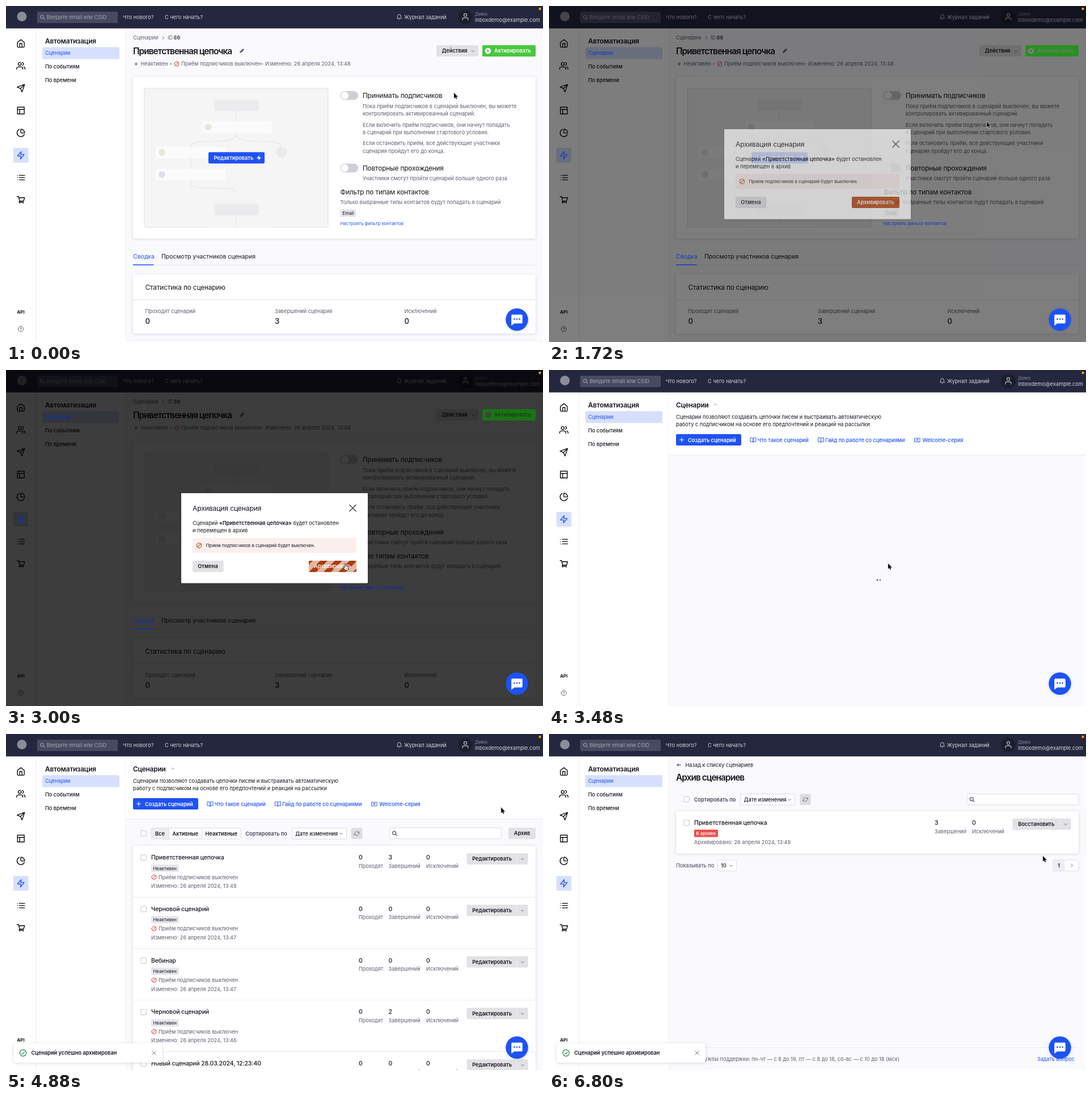
An HTML page for the animation above (6840 ms loop, 947 by 592 pixels).

```html
<!DOCTYPE html>
<html lang="ru">
<head>
<meta charset="utf-8">
<title>Архивация сценария</title>
<style>
html, body { margin: 0; width: 100%; height: 100%; overflow: hidden; background: #fafafd; }
svg { display: block; width: 100%; height: 100%; font-family: Inter, "Noto Sans", sans-serif; }
text { white-space: pre; }
</style>
</head>
<body>
<svg id="stage" viewBox="0 0 947 592"></svg>
<script>
const LOOP = 6840, STEP = 40;
const BLUE = '#1f52f5', INK = '#15161f', GREY = '#5c5e70', RED = '#dc3a35', RUST = '#b8430f', BTN = '#e2e2e5';

const ICON = {
  home: 'M3 9l9-7 9 7v11a2 2 0 0 1-2 2H5a2 2 0 0 1-2-2zM9 22V12h6v10',
  users: 'M17 21v-2a4 4 0 0 0-4-4H5a4 4 0 0 0-4 4v2M23 21v-2a4 4 0 0 0-3-3.87M16 3.13a4 4 0 0 1 0 7.75M5 7a4 4 0 1 0 8 0a4 4 0 1 0-8 0',
  send: 'M22 2L11 13M22 2l-7 20-4-9-9-4z',
  layout: 'M3 3h18v18H3zM3 9h18M9 21V9',
  pie: 'M21.2 15.9A10 10 0 1 1 8 2.8M22 12A10 10 0 0 0 12 2v10z',
  zap: 'M13 2L3 14h9l-1 8 10-12h-9z',
  list: 'M8 6h14M8 12h14M8 18h14M3 6h.01M3 12h.01M3 18h.01',
  cart: 'M2 3h4l3 12h10l3-9H7M9 15l-2 3h12M9 21h.01M18 21h.01',
  bell: 'M18 8A6 6 0 0 0 6 8c0 7-3 9-3 9h18s-3-2-3-9M13.7 21a2 2 0 0 1-3.4 0',
  user: 'M20 21v-2a4 4 0 0 0-4-4H8a4 4 0 0 0-4 4v2M8 7a4 4 0 1 0 8 0a4 4 0 1 0-8 0',
  book: 'M2 3h6a4 4 0 0 1 4 4v14a3 3 0 0 0-3-3H2zM22 3h-6a4 4 0 0 0-4 4v14a3 3 0 0 1 3-3h7z',
  video: 'M2 5h20v14H2zM10 9v6l5-3z',
  refresh: 'M23 4v6h-6M1 20v-6h6M3.5 9a9 9 0 0 1 14.9-3.4L23 10M1 14l4.6 4.4A9 9 0 0 0 20.5 15',
  search: 'M3 10a7 7 0 1 0 14 0a7 7 0 1 0-14 0M21.5 21.5l-6-6',
  ban: 'M2 12a10 10 0 1 0 20 0a10 10 0 1 0-20 0M19 5L5 19',
  check: 'M2 12a10 10 0 1 0 20 0a10 10 0 1 0-20 0M7.5 12.5l3 3 6-6',
  help: 'M2 12a10 10 0 1 0 20 0a10 10 0 1 0-20 0M9 9.5a3 3 0 1 1 3 3.5M12 17h.01',
  back: 'M21 12H4M11 5l-7 7 7 7',
  down: 'M5 9l7 7 7-7', up: 'M5 15l7-7 7 7', right: 'M9 5l7 7-7 7',
  plus: 'M12 3v18M3 12h18', cross: 'M4 4l16 16M20 4L4 20'
};

// Drawing helpers: each returns SVG markup
const text = (x, y, s, o = {}) =>
  `<text x="${x}" y="${y}" font-size="${o.size || 9.2}" font-weight="${o.w || 400}" fill="${o.fill || INK}"` +
  ` text-anchor="${o.at || 'start'}" letter-spacing="${o.ls || 0}">${s}</text>`;
const rect = (x, y, w, h, fill, r = 0, more = '') =>
  `<rect x="${x}" y="${y}" width="${w}" height="${h}" rx="${r}" fill="${fill}" ${more}/>`;
const circ = (x, y, r, fill) => `<circle cx="${x}" cy="${y}" r="${r}" fill="${fill}"/>`;
const path = (d, stroke, w = 1, fill = 'none') =>
  `<path d="${d}" stroke="${stroke}" stroke-width="${w}" fill="${fill}" stroke-linecap="round" stroke-linejoin="round"/>`;
const icon = (name, x, y, size, color, w = 2, fill) =>
  `<g transform="translate(${x - size / 2} ${y - size / 2}) scale(${size / 24})">${path(ICON[name], color, w, fill)}</g>`;
const group = (id, body, more = '') => `<g id="${id}" ${more}>${body}</g>`;
const card = (x, y, w, h, r = 4) => rect(x, y, w, h, '#fff', r, 'filter="url(#soft)"');
const field = (x, y, w, h = 19.5) => rect(x, y, w, h, '#fff', 2, 'stroke="#d3d4dc" stroke-width=".8"');
const box = (x, y) => rect(x, y, 9.5, 9.5, '#fff', 1, 'stroke="#c3c4cd" stroke-width="1"');
const head = (x, y, s, w = 400, size = 11.84) => text(x, y, s, { size, w, ls: '-.014em' });
const title = (x, y, s) => text(x, y, s, { size: 15.4, w: 600, ls: '-.06em' });
const grey = (x, y, s) => text(x, y, s, { fill: GREY });
const bold = (x, y, s, fill, at) => text(x, y, s, { w: 600, fill, at });

function frame() {
  const side = ['home', 'users', 'send', 'layout', 'pie', 'zap', 'list', 'cart'];
  return rect(0, 0, 947, 592, '#fafafd') + rect(0, 39, 211, 553, '#fff') +
    rect(52.5, 39, .8, 553, '#e8e8ef') + rect(210.5, 39, .8, 553, '#ededf3') +
    rect(13, 250, 26.5, 26, '#d6e0fc', 2) +
    side.map((n, i) => icon(n, 26.2, 66 + i * 39.4, 16, n == 'zap' ? BLUE : '#0c0c10', 2.1)).join('') +
    text(26, 542, 'API', { size: 7.9, w: 700, at: 'middle' }) + icon('help', 26, 569, 11, '#555764') +
    head(69, 65.5, 'Автоматизация', 600) + rect(64, 72.5, 136, 21, '#d6e0fc', 2) +
    text(69, 86, 'Сценарии', { fill: BLUE }) + text(69, 110, 'По событиям', { w: 500 }) +
    text(69, 133.5, 'По времени', { w: 500 });
}

function topBar() {
  const pale = { fill: '#d5d6de' };
  return rect(0, 0, 947, 39.5, '#24273e') + circ(28, 18.5, 8.5, '#8b8c98') +
    rect(55, 10, 142, 20, '#484b60', 2) + icon('search', 64.5, 20, 10, '#aeb0bb', 2.4) +
    text(71.5, 23, 'Введите email или CSID', { fill: '#a3a5b2' }) +
    text(206, 23, 'Что нового?', pale) + text(280, 23, 'С чего начать?', pale) +
    icon('bell', 693.5, 19.5, 11, '#d5d6de') + text(702, 23, 'Журнал заданий', pale) +
    circ(810, 19.3, 13, '#1c1e2e') + icon('user', 810, 19, 15, '#c4c5cd', 1.8) +
    text(827, 16.5, 'Демо', { size: 7.9, fill: '#878997' }) +
    text(827, 27.5, 'inboxdemo@example.com', pale);
}

function flow() {
  const wire = d => path(d, '#e6e6e9', 1.4);
  const node = (x, y, dot) => rect(x, y, 123, 20, '#fbfbfc', 2) + circ(x + 11, y + 10, 6, dot);
  return rect(244, 145, 324, 244.5, '#f5f5f6', 2, 'stroke="#dadadd" stroke-width=".9"') +
    wire('M406 185V204M406 224v4C400 240 380 238 350 239Q326 239 326 248M406 228C412 240 432 238 458 239Q484 239 486 248') +
    wire('M326 268v19M326 307v7C326 328 404 314 406 328M406 368v21') +
    rect(367, 165, 79, 20, '#ebebed', 3) + rect(367, 348.5, 79, 20, '#ebebed', 3) +
    rect(346, 387.5, 122, 1.6, '#fdfdfd') +
    node(345.5, 203.5, '#dfe9d9') + node(264, 248, '#ebe7d4') + node(264, 287, '#dee1e9') +
    circ(486, 258, 9.5, '#eaeaec') +
    rect(357, 257.5, 99, 20, BLUE, 2) + bold(366.5, 271, 'Редактировать', '#fff') +
    icon('zap', 446, 267.5, 9.5, '#fff', 1, '#fff');
}

function detailPage() {
  const toggle = y => rect(589.5, y, 31.5, 15.5, '#cdced7', 7.75) + circ(597.5, y + 7.75, 6.7, '#fff');
  const stat = (x, s, n) => grey(x, 541, s) + text(x, 559.5, n, { size: 13.2, w: 500 });
  return grey(224, 59, 'Сценарии') + icon('right', 277, 56, 9, GREY, 2.6) + grey(285, 59, 'ID') +
    bold(295.5, 59, '86', '#3d3f50') + title(224, 85, 'Приветственная цепочка') +
    path('M412.5 82.3l.7-2.3 4.8-4.8 1.7 1.7-4.8 4.8z', '#55565f', .5, '#55565f') +
    circ(229.5, 102, 2.6, '#a0a1ab') + grey(237.5, 105, 'Неактивен') + circ(290.5, 102.2, 1.1, GREY) +
    icon('ban', 301, 102, 9.6, RED, 2.5) + grey(309, 105, 'Приём подписчиков выключен') +
    circ(451.5, 102.2, 1.1, GREY) + grey(457, 105, 'Изменено: 26 апреля 2024, 13:48') +
    `<rect id="actions" x="759" y="69" width="74" height="20" rx="2"/>` + bold(768.5, 82.2, 'Действия') +
    icon('down', 823.5, 79.3, 8, '#44454f', 2.4) +
    rect(840, 69, 94, 20, '#49c740', 2) + circ(850, 79, 5.2, '#fff') + path('M848.6 76.8v4.4l3.6-2.2z', '#49c740', .4, '#49c740') +
    bold(861, 82.2, 'Активировать', '#fff') +
    card(224, 125, 710, 284.5) + flow() +
    toggle(150) + head(629, 162, 'Принимать подписчиков') +
    grey(629, 179.5, 'Пока приём подписчиков в сценарий выключен, вы можете') +
    grey(629, 192.5, 'контролировать активированный сценарий.') +
    grey(629, 212.5, 'Если включить приём подписчиков, они начнут попадать') +
    grey(629, 225.5, 'в сценарий при выполнении стартового условия.') +
    grey(629, 245.3, 'Если остановить приём, все действующие участники') +
    grey(629, 258.5, 'сценария пройдут его до конца.') +
    toggle(277.7) + head(629, 290, 'Повторные прохождения') +
    grey(629, 307.3, 'Участники смогут пройти сценарий больше одного раза') +
    head(589.5, 332.3, 'Фильтр по типам контактов') +
    grey(589.5, 349.3, 'Только выбранные типы контактов будут попадать в сценарий') +
    rect(589.5, 358.5, 27.5, 13, '#e2e3ea', 1) + text(593.3, 367.8, 'Email', { size: 7.9 }) +
    text(589.5, 386, 'Настроить фильтр контактов', { size: 7.9, fill: BLUE }) +
    text(224, 445, 'Сводка', { size: 10.5, fill: BLUE }) + text(274, 445, 'Просмотр участников сценария', { size: 10.5 }) +
    rect(224, 456, 710, .8, '#dcdde6') + rect(224, 455.3, 36.5, 1.5, BLUE) +
    card(224, 473, 710, 104) + head(245.5, 499.5, 'Статистика по сценарию') + rect(224, 517, 710, .8, '#dcdde4') +
    stat(245.5, 'Проходят сценарий', '0') + stat(474, 'Завершений сценария', '3') + stat(702.5, 'Исключений', '0') +
    card(224, 590, 710, 20);
}

const menuItems = [
  ['Создать копию', 92, 1], ['Добавить участников', 115, 0], ['Исключить участников', 138, 0],
  ['Фильтр по типам контактов', 161, 1], ['Архивировать', 195.5, 2]
];
function menu() {
  return rect(691, 89, 142.5, 133, '#fff', 2, 'filter="url(#soft)"') + menuItems.map(([s, y, kind], i) =>
    rect(691, y, 142.5, 23, kind == 2 ? RUST : BLUE, 0, `id="bg${i}"`) +
    `<g id="item${i}" fill="${['#85868f', INK, RUST][kind]}"><text x="701" y="${y + 15}" font-size="9.2">${s}</text></g>`).join('');
}

function dialog() {
  return rect(309, 217, 329, 158.5, '#fff', 1, 'filter="url(#soft)"') +
    head(329, 248, 'Архивация сценария', 400, 12.2) + icon('cross', 611.5, 243.3, 17, '#3f404a', 2) +
    text(329, 273, 'Сценарий <tspan font-weight="600">«Приветственная цепочка»</tspan> будет остановлен') +
    text(329, 286, 'и перемещен в архив') +
    rect(329, 296, 289, 26.3, '#fbefed', 2) + icon('ban', 340.5, 309.2, 10, RUST, 2.6) +
    text(352.5, 312.3, 'Прием подписчиков в сценарий будет выключен.', { size: 7.9 }) +
    rect(329, 336, 54.5, 20, BTN, 2) + bold(356, 349.2, 'Отмена', INK, 'middle') +
    `<rect id="confirm" x="534" y="336" width="84" height="20" rx="2"/>` + bold(576, 349.2, 'Архивировать', '#fff', 'middle') +
    `<rect id="busy" x="534" y="336" width="84" height="20" rx="2" fill="url(#stripes)"/>`;
}

// Bright accents that remain visible through the dark veil
function accents() {
  const c = '#1c38ab';
  return rect(840, 69, 94, 20, '#1a7415', 2) + circ(850, 79, 5.2, '#3d433c') + bold(861, 82.2, 'Активировать', '#16401a') +
    text(69, 86, 'Сценарии', { fill: c }) + icon('zap', 26.2, 263, 16, c) +
    text(224, 445, 'Сводка', { size: 10.5, fill: c }) + rect(224, 455.3, 36.5, 1.5, c) +
    text(589.5, 386, 'Настроить фильтр контактов', { size: 7.9, fill: c });
}

const link = (x, s) => text(x, 126.5, s, { w: 500, fill: BLUE });
const sorter = (x, y) => bold(x, y + 3.5, 'Сортировать по', '#44465a') + field(x + 82, y - 9.7, 96) +
  text(x + 88, y + 3.5, 'Дате изменения', { w: 500 }) + icon('down', x + 168.5, y + .5, 8, '#44454f', 2.4) +
  rect(x + 186.5, y - 9.7, 19.5, 19.5, '#dedee2', 2) + icon('refresh', x + 196.3, y, 9.5, '#6b6c76', 2.2);
const split = (x, y, s) => rect(x, y, 920.5 - x, 20, BTN, 2) + rect(900.5, y, .7, 20, '#f6f6f8') +
  bold(x + 9.7, y + 13.2, s) + icon('down', 911, y + 10.3, 8, '#44454f', 2.4);
const count = (x, y, n, s) => text(x, y, n, { size: 10.5, w: 500 }) + grey(x, y + 14.5, s);
const find = (x, y) => field(x, y, 197) + icon('search', x + 9, y + 10, 10, '#4f505c', 3);

function listHead() {
  return rect(211, 39, 736, 110, '#fff') + rect(211, 149, 736, .8, '#e6e7ee') +
    head(224, 65.8, 'Сценарии', 600) + icon('up', 294, 61, 8, GREY, 2.2) +
    text(224, 86, 'Сценарии позволяют создавать цепочки писем и выстраивать автоматическую') +
    text(224, 99.2, 'работу с подписчиком на основе его предпочтений и реакций на рассылки') +
    rect(224, 113, 115, 20, BLUE, 2) + icon('plus', 234, 123, 9, '#fff', 3) + bold(245, 126.5, 'Создать сценарий', '#fff') +
    icon('book', 360, 123.5, 11, BLUE) + link(367.5, 'Что такое сценарий') +
    icon('book', 479.5, 123.5, 11, BLUE) + link(487, 'Гайд по работе со сценариями') +
    icon('video', 649.5, 123.5, 11, BLUE) + link(658.5, 'Welcome-серия');
}

function listBody() {
  const rows = [
    ['Приветственная цепочка', 3, 48], ['Черновой сценарий', 0, 47], ['Вебинар', 0, 47],
    ['Черновой сценарий', 2, 46], ['Новый сценарий 28.03.2024, 12:23:40', 0, 46]
  ];
  const row = ([s, done, min], i) => `<g transform="translate(0 ${i * 90.8})">` +
    box(237.8, 213) + text(256, 221, s, { size: 10.5, w: 500, ls: '-.011em' }) +
    rect(256, 230, 49, 13, '#e6e7ed', 1) + text(259.5, 239.5, 'Неактивен', { size: 7.9 }) +
    icon('ban', 261, 252.2, 9.6, RED, 2.5) + grey(269, 255.5, 'Приём подписчиков выключен') +
    grey(256, 271, 'Изменено: 26 апреля 2024, 13:' + min) +
    count(622, 221, 0, 'Проходят') + count(674.5, 221, done, 'Завершений') + count(741, 221, 0, 'Исключений') +
    split(812.5, 210, 'Редактировать') + rect(224, 287, 710, .8, '#e4e5ec') + '</g>';
  return box(237.8, 170.3) + field(256, 165.5, 158) + rect(256.3, 165.8, 31, 19, '#ececf0', 2) +
    rect(287, 165.5, .8, 19.5, '#d3d4dc') + rect(345, 165.5, .8, 19.5, '#d3d4dc') +
    bold(263, 179, 'Все') + bold(293.5, 179, 'Активные') + bold(351.5, 179, 'Неактивные') +
    sorter(422.3, 175.3) + find(676.5, 165.2) +
    `<rect id="archive" x="886" y="165" width="48" height="20" rx="2"/>` + bold(910, 178.4, 'Архив', INK, 'middle') +
    card(224, 197, 710, 420) + rows.map(row).join('');
}

function archiveHead() {
  return icon('back', 229, 54.5, 9, INK, 2.4) + text(240.5, 58, 'Назад к списку сценариев') +
    title(224, 81.8, 'Архив сценариев') + rect(224, 552, 710, .8, '#e4e5ec') +
    text(618, 576.3, 'Часы службы поддержки: пн-чт — с 8 до 19, пт — с 8 до 18, сб-вс — с 10 до 18 (мск)', { fill: GREY, at: 'end' }) +
    text(927, 576.3, 'Задать вопрос', { fill: BLUE, at: 'end' });
}

function archiveBody() {
  return box(237.8, 110.3) + sorter(255.8, 115.3) + find(737, 105.5) + card(224, 136, 710, 74.5) +
    box(237.8, 151.8) + text(256, 160, 'Приветственная цепочка', { size: 10.5, w: 500, ls: '-.011em' }) +
    rect(256, 168.5, 42, 13, '#e8504c', 1) + text(259.5, 178, 'В архиве', { size: 7.9, w: 500, fill: '#fff' }) +
    grey(256, 194, 'Архивировано: 26 апреля 2024, 13:49') +
    count(680, 160, 3, 'Завершений') + count(746, 160, 0, 'Исключений') + split(817.5, 148.7, 'Восстановить') +
    text(224, 235, 'Показывать по', { fill: '#3d3f50' }) + field(297, 221.8, 33.5) + text(303, 235, '10', { w: 500 }) +
    icon('down', 321, 232, 8, '#44454f', 2.4) + field(888.5, 221.8, 45.5) + rect(888.5, 221.8, 21, 19.5, '#eceef3', 2) +
    bold(899, 235, '1', INK, 'middle') + icon('right', 922, 231.6, 9, '#55565f', 2.2);
}

const loader = id => group(id, [-5, 0, 5].map((d, i) => `<circle id="${id}${i}" cx="${579 + d}" r="1.4" fill="#3c3d48"/>`).join(''));

function chat() {
  return `<g filter="url(#soft)">${circ(901, 552.5, 19.7, BLUE)}</g>` +
    path('M893 544h16a1.5 1.5 0 0 1 1.5 1.5v12a1.5 1.5 0 0 1-1.5 1.5h-12.5l-5 3.8v-17.3a1.5 1.5 0 0 1 1.5-1.5z', '#fff', .6, '#fff') +
    [896.5, 901, 905.5].map(x => circ(x, 551.7, 1.35, BLUE)).join('');
}

function toast() {
  return card(13, 545, 263, 34) + icon('check', 30, 562, 13.5, '#17813d', 2) +
    bold(44.5, 565.3, 'Сценарий успешно архивирован') + icon('cross', 261, 562, 10, '#6b6c76', 2.2);
}

document.getElementById('stage').innerHTML =
  `<defs><filter id="soft" x="-20%" y="-20%" width="140%" height="140%"><feDropShadow dx="0" dy="1" stdDeviation="2.5" flood-color="#23263f" flood-opacity=".16"/></filter>
  <pattern id="stripes" width="26" height="26" patternUnits="userSpaceOnUse"><path d="M0 26L26 0H13L0 13zM26 26V13L13 26z" fill="#fff" fill-opacity=".62"/></pattern></defs>` +
  frame() + group('detail', detailPage()) + group('listHead', listHead()) + group('listBody', listBody()) +
  group('archHead', archiveHead()) + group('archBody', archiveBody()) + loader('dotsA') + loader('dotsB') +
  topBar() + group('menu', menu()) + group('veil', rect(0, 0, 947, 592, '#000', 0, 'fill-opacity=".76"') + accents()) +
  group('dialog', dialog()) + group('toast', toast()) + chat() +
  group('status', rect(-2, 578.5, 207, 16, '#b3becc', 2) +
    text(3, 588.2, 'https://app.sendsay.ru/automation/workflows/archive', { size: 7.5, fill: '#2c3340' })) +
  circ(941.5, 5, 2.2, '#ff9d0a') +
  group('arrow', path('M0 0V9.6L2.2 7.6 3.7 11 5.2 10.3 3.8 7.1H6.8Z', '#fff', 1.4) +
    path('M0 0V9.6L2.2 7.6 3.7 11 5.2 10.3 3.8 7.1H6.8Z', '#111', .2, '#111')) +
  group('hand', path('M-1 1.2q0-1.2 1-1.2t1 1.2v3.2q1.2-.6 1.7.4 1.3-.5 1.7.5 1.4-.2 1.4 1.2v2.4q0 3-3 3H.9Q-.4 11-1.4 9.4L-3.6 6.6q.2-1.4 1.6-.6L-1 7z', '#1a1a1f', .8, '#fff') +
    path('M1.2 7v2M3 7v2', '#1a1a1f', .5));

const el = {};
document.querySelectorAll('[id]').forEach(n => el[n.id] = n);
const show = (id, on) => el[id].setAttribute('display', on ? 'inline' : 'none');
const set = (id, k, v) => el[id].setAttribute(k, v);
const clamp = u => Math.min(1, Math.max(0, u));
const smooth = u => u * u * (3 - 2 * u), easeIn = u => u * u, easeOut = u => 1 - (1 - u) * (1 - u);

// Pointer moves: start, end, bend point, end point, easing
const moves = [
  [0, 480, 752, 118, 806, 78, smooth], [880, 1080, 798, 128, 786, 175, easeIn],
  [1080, 1440, 780, 194, 772, 204, easeOut], [2040, 2680, 690, 265, 598, 341, smooth],
  [4360, 5040, 810, -15, 901, 171, smooth], [6680, 6800, 888, 196, 871, 215, easeOut]
];
function pointer(t) {
  let x = 790, y = 153;
  for (const [a, b, cx, cy, ex, ey, ease] of moves) {
    if (t < a) break;
    const u = ease(clamp((t - a) / (b - a))), v = 1 - u;
    x = v * v * x + 2 * u * v * cx + u * u * ex;
    y = v * v * y + 2 * u * v * cy + u * u * ey;
  }
  return [x, y];
}

function render(t) {
  const [x, y] = pointer(t);
  const over = (l, top, w, h) => x >= l && x <= l + w && y >= top && y <= top + h;
  const isList = t >= 3440 && t < 5160, isArch = t >= 5160, menuOn = t >= 680 && t < 1680;
  const listReady = isList && t >= 3760, archReady = t >= 5400;

  show('detail', t < 3440);
  show('listHead', isList); show('listBody', listReady);
  show('archHead', isArch); show('archBody', archReady);

  set('actions', 'fill', t < 1680 && (menuOn || over(759, 69, 74, 20)) ? '#d2d2d6' : BTN);
  show('menu', menuOn);
  menuItems.forEach(([, top, kind], i) => {
    const on = kind && over(691, top, 142, 23);
    show('bg' + i, on);
    set('item' + i, 'fill', on ? '#fff' : ['#85868f', INK, RUST][kind]);
    set('item' + i, 'font-weight', on ? 500 : 400);
  });

  const dim = t < 2840 ? clamp((t - 1640) / 120) : clamp((3480 - t) / 120);
  set('veil', 'opacity', dim); set('dialog', 'opacity', dim);
  show('veil', dim > 0); show('dialog', dim > 0);
  const onConfirm = dim > 0 && over(534, 336, 84, 20);
  set('confirm', 'fill', onConfirm ? '#ad3d0c' : RUST);
  show('busy', t >= 2840 && dim > 0);
  set('stripes', 'x', 6 + (t - 3000) * .026);

  const onArchive = listReady && over(886, 165, 48, 20);
  set('archive', 'fill', onArchive ? '#d2d2d6' : BTN);

  for (const [id, on, cy] of [['dotsA', isList && !listReady, 370], ['dotsB', isArch && !archReady, 322.3]]) {
    show(id, on);
    for (let i = 0; i < 3; i++) {
      set(id + i, 'cy', cy);
      set(id + i, 'opacity', Math.max(0, Math.cos(((t - 5320) / 600 - (i - 1) * .22 + .15) * 2 * Math.PI)));
    }
  }

  const rise = easeOut(clamp((t - 3720) / 320));
  show('toast', rise > 0);
  set('toast', 'opacity', rise);
  set('toast', 'transform', `translate(0 ${(1 - rise) * 40})`);
  const hint = t < 5400 ? clamp((t - 5120) / 80) : clamp((5680 - t) / 160);
  show('status', hint > 0);
  set('status', 'opacity', hint);

  const isHand = onConfirm || onArchive;
  show('hand', isHand); show('arrow', !isHand);
  set('hand', 'transform', `translate(${x} ${y})`);
  set('arrow', 'transform', `translate(${x} ${y})`);
}

const start = performance.now();
function tick() {
  const t = (performance.now() - start) % LOOP;
  render(Math.floor(t / STEP) * STEP);
  requestAnimationFrame(tick);
}
tick();
</script>
</body>
</html>
```
